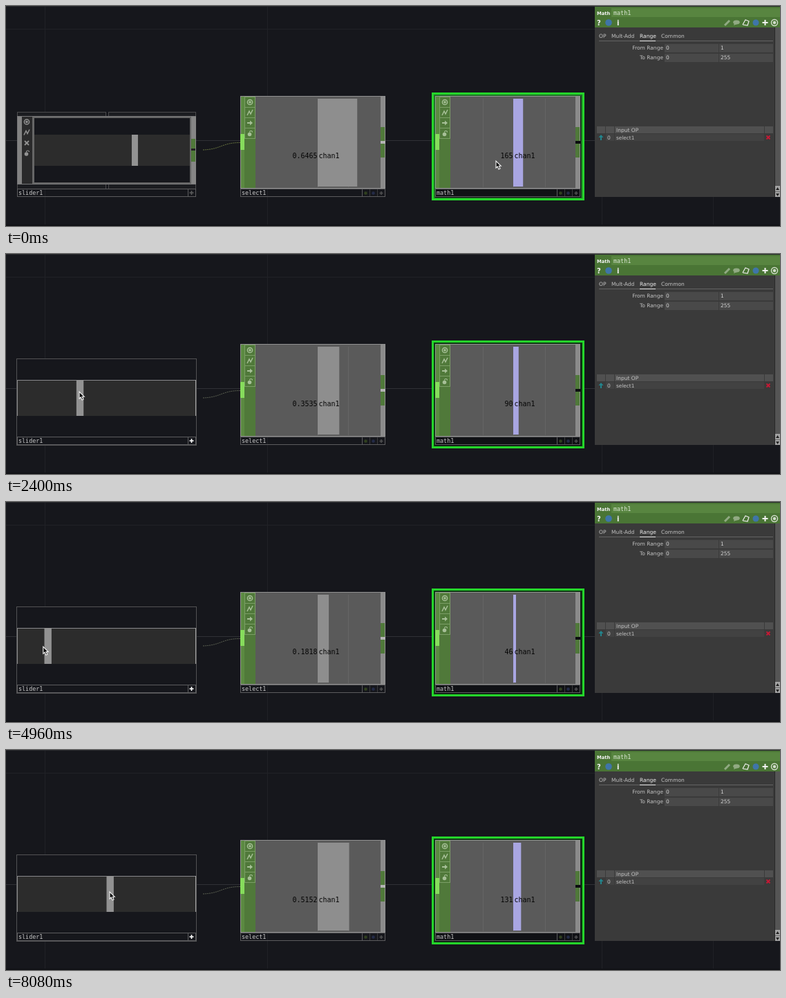
Write an HTML page with a canvas that moves like this. It is 1120 px wide and 318 px high and loops after 8160 ms.

```html
<!DOCTYPE html>
<html lang="en">
<head>
<meta charset="utf-8">
<title>Slider range</title>
<style>
html, body { margin: 0; width: 100%; height: 100%; overflow: hidden; background: #16171c; }
canvas { display: block; }
</style>
</head>
<body>
<canvas id="stage" width="1120" height="318"></canvas>
<script>
const ctx = document.getElementById('stage').getContext('2d');
const LOOP = 8160, STEP = 80;
const MONO = '"DejaVu Sans Mono", monospace', SANS = '"DejaVu Sans", sans-serif';
const GREEN = '#50793a', DARK = '#16171c';

// Pointer path: time, x, y
const path = [
  [0, 709, 224], [80, 690, 232], [480, 400, 283], [720, 281, 265], [880, 268, 268],
  [1280, 268, 268], [1600, 184, 206], [2320, 106, 199], [2400, 106, 199],
  [2900, 150, 202], [3600, 94, 204], [4000, 105, 206], [4080, 105, 206],
  [4320, 87, 208], [4480, 85, 208], [4640, 85, 208], [5440, 7, 211],
  [5520, 29, 211], [6320, 277, 216], [6400, 253, 217], [7120, 149, 203],
  [7680, 149, 203], [7840, 150, 205], [LOOP, 150, 205]
];

const clamp = (n, lo, hi) => Math.min(hi, Math.max(lo, n));

function pointer(t) {
  const i = Math.max(1, path.findIndex(p => p[0] >= t));
  const [t0, x0, y0] = path[i - 1], [t1, x1, y1] = path[i];
  const k = (t - t0) / (t1 - t0);
  return [x0 + (x1 - x0) * k, y0 + (y1 - y0) * k];
}

// The slider follows the pointer one step late, in 99 divisions.
function sliderValue(t) {
  if (t < 1680) return 64 / 99;
  const [x] = pointer(t - STEP);
  return Math.round(clamp((x - 14) / 262, 0, 1) * 99) / 99;
}

function box(x, y, x2, y2, fill, stroke) {
  if (fill) { ctx.fillStyle = fill; ctx.fillRect(x, y, x2 - x, y2 - y); }
  if (stroke) {
    ctx.strokeStyle = stroke;
    ctx.lineWidth = 1;
    ctx.strokeRect(x + .5, y + .5, x2 - x - 1, y2 - y - 1);
  }
}

function text(s, x, y, size, color, font = MONO, align = 'left', weight = '') {
  ctx.font = `${weight} ${size}px ${font}`;
  ctx.textAlign = align;
  ctx.fillStyle = color;
  ctx.fillText(s, x, y);
}

function poly(points, stroke, width = 1, fill) {
  ctx.beginPath();
  points.forEach(([x, y]) => ctx.lineTo(x, y));
  if (fill) { ctx.closePath(); ctx.fillStyle = fill; ctx.fill(); }
  if (stroke) { ctx.strokeStyle = stroke; ctx.lineWidth = width; ctx.stroke(); }
}

function disc(x, y, r, fill, stroke, width = 1) {
  ctx.beginPath();
  ctx.arc(x, y, r, 0, 7);
  if (fill) { ctx.fillStyle = fill; ctx.fill(); }
  if (stroke) { ctx.strokeStyle = stroke; ctx.lineWidth = width; ctx.stroke(); }
}

function plus(x, y, r, color, width = 2) {
  poly([[x - r, y], [x + r, y]], color, width);
  poly([[x, y - r], [x, y + r]], color, width);
}

function cross(x, y, r, color, width) {
  poly([[x - r, y - r], [x + r, y + r]], color, width);
  poly([[x - r, y + r], [x + r, y - r]], color, width);
}

function target(x, y, r, color) {
  disc(x, y, r, null, color, 1.5);
  disc(x, y, r * .5, color);
}

function flags(x, y, color, third) {
  target(x, y, 3.6, color);
  poly([[x - 4, y + 19], [x - 1, y + 13], [x + 1, y + 17], [x + 4, y + 11]], color, 1.5);
  if (third === 'cross') cross(x, y + 30.5, 3, color, 1.8);
  else {
    poly([[x - 4, y + 30], [x + 3, y + 30]], color, 2);
    poly([[x, y + 26.5], [x + 4, y + 30], [x, y + 33.5]], null, 1, color);
  }
  disc(x - .5, y + 46.5, 2.8, color);
  ctx.beginPath();
  ctx.arc(x + 1.5, y + 43.5, 2, Math.PI, 0);
  ctx.strokeStyle = color;
  ctx.lineWidth = 1.2;
  ctx.stroke();
}

function nameBar(name, x, x2, end) {
  box(x, 264, x2, 276, null, '#5c5c5e');
  box(x2 - 1, 264, end, 276, null, '#5c5c5e');
  text(name, x + 2, 273, 8.4, '#c8c8c8');
}

function backdrop() {
  box(0, 0, 1120, 318, DARK);
  box(0, 0, 1120, 1, '#292a2e');
  for (const x of [57, 379, 863, 1024]) box(x - 1, 1, x, 316, '#202126');
  box(0, 33, 852, 34, '#202126');
  box(0, 194, 852, 195, '#303136');
  box(0, 316, 1120, 318, '#101115');
}

function wire(active) {
  ctx.beginPath();
  ctx.moveTo(285, 208);
  ctx.bezierCurveTo(312, 207, 312, 197.5, 339, 197.5);
  ctx.strokeStyle = active ? '#5c6152' : '#68753f';
  ctx.lineWidth = 1;
  ctx.setLineDash([2, 1]);
  ctx.stroke();
  ctx.setLineDash([]);
}

function sliderNode(v, active, lit) {
  if (lit) box(12, 148, 280, 280, '#2c2c2c');
  if (active) {
    if (!lit) box(15, 151, 276, 277, DARK, '#525254');
    box(17, 182, 275, 234, '#2c2c2c');
    box(17, 182, 275, 183, '#88888a');
    box(16, 182, 17, 234, '#88888a');
    box(274, 182, 275, 234, '#a5a5a5');
    const mid = clamp(11.6 + 270 * v, 17, 274);
    box(Math.max(17, mid - 5.2), 182, Math.min(275, mid + 5.2), 234, '#929292');
  } else {
    for (const [y, y2] of [[153, 160], [257, 265]]) {
      box(16, y, 145, y2, '#1b1c20', '#4a4a4c');
      box(148, y, 275, y2, '#1b1c20', '#4a4a4c');
    }
    box(16, 159, 275, 258, '#2a2a2b', '#777779');
    box(17, 160, 23, 257, '#828282');
    flags(30, 167.5, '#929292', 'cross');
    box(38, 160, 268, 257, '#666');
    box(41, 162, 266, 255, DARK);
    box(41, 186, 266, 231, '#2c2c2c');
    const mid = 41 + 225 * v;
    box(mid - 4.5, 186, mid + 4.5, 231, '#929292');
    box(268, 160, 275, 257, '#858585');
    box(268, 192, 274, 206, GREEN);
    box(268, 206, 274, 209, '#222');
    box(268, 209, 274, 225, GREEN);
  }
  nameBar('slider1', 16, 264, 275);
  plus(268.5, 270, 3, active ? '#fff' : '#5c5c5c', 1.6);
}

function channelNode(x, name, zero, scale, guides, value, label, bar) {
  box(x, 130, x + 210, 264, '#5a5a5a', '#929292');
  box(x + 1, 131, x + 6, 263, '#5b8a41');
  box(x, 185, x + 6, 208, '#86dc5c');
  box(x + 6, 131, x + 22, 263, GREEN);
  for (let y = 131; y < 190; y += 15) box(x + 6, y, x + 22, y + 16, null, '#7b9e66');
  flags(x + 14, 139, '#a6bf97');
  for (const g of guides) box(g, 134, g + 1, 262, '#656565');
  ctx.setLineDash([3, 2]);
  poly([[zero + .5, 134], [zero + .5, 262]], '#6c6c6c', 1);
  ctx.setLineDash([]);
  box(zero, 134, zero + scale * value, 261, bar);
  box(x + 203, 131, x + 209, 263, '#8b8b8b');
  box(x + 203, 175, x + 209, 195, GREEN);
  box(x + 203, 195, x + 210, 199, name === 'math1' ? '#0c0d10' : '#b4b4b4');
  box(x + 203, 199, x + 209, 219, GREEN);
  text(label, zero - .5, 220, 10, '#050505', MONO, 'right');
  text('chan1', zero + 1.5, 220, 10, '#050505');
  nameBar(name, x, x + 177, x + 210);
  for (const d of [187, 198]) box(x + d, 265, x + d + 1, 275, '#3a3a3c');
  disc(x + 181.5, 270.5, 2.3, '#30401f');
  disc(x + 192.5, 270.5, 2.3, '#242b48');
  plus(x + 204, 270.5, 2.5, '#4f4f50', 1.6);
}

function panel() {
  box(852, 1, 1120, 276, '#3a3a3a');
  box(852, 1, 1120, 31, '#4a7535');
  box(876, 3, 1120, 16, '#588540');
  text('Math', 855, 13, 6.8, '#f2f2f2', SANS, 'left', 'bold');
  text('math1', 879, 13, 8.4, '#dce8d5');
  text('?', 855, 28, 10, '#f2f2f2', SANS, 'left', 'bold');
  disc(872, 24, 4.8, '#3f75a8');
  text('i', 884, 28, 10, '#f2f2f2', SANS, 'left', 'bold');

  poly([[1040, 28], [1047, 21]], '#91aa83', 3);
  ctx.beginPath();
  ctx.ellipse(1057, 23.5, 4.8, 3, 0, 0, 7);
  ctx.fillStyle = '#91aa83';
  ctx.fill();
  poly([[1054, 25], [1053, 28], [1058, 26]], null, 1, '#91aa83');
  poly([[1066, 27], [1070, 20], [1075, 22], [1073, 28], [1066, 27]], '#eee', 1.2);
  disc(1085, 24, 4.5, '#3f75a8');
  plus(1098.5, 24, 4, '#f2f2f2', 2);
  target(1112, 24, 4.5, '#cfdac8');

  const tabs = [['OP', 858], ['Mult-Add', 876], ['Range', 917], ['Common', 948]];
  for (const [s, x] of tabs) text(s, x, 46, 7.5, s === 'Range' ? '#eee' : '#c4c4c4', SANS);
  box(858, 50, 1110, 51, '#636363');
  box(917, 50, 940, 51, '#eee');

  [['From Range', 55, '0', '1'], ['To Range', 69, '0', '255']].forEach(([s, y, a, b]) => {
    text(s, 951, y + 8, 7.5, '#c4c4c4', SANS, 'right');
    box(953, y, 1031, y + 12, '#494949');
    box(1032, y, 1110, y + 12, '#494949');
    text(a, 955, y + 8, 7.5, '#d2d2d2', SANS);
    text(b, 1034, y + 8, 7.5, '#d2d2d2', SANS);
  });

  for (const [a, b] of [[855, 867], [868, 880], [881, 1097], [1098, 1110]])
    box(a, 174, b, 184, '#505050');
  text('Input OP', 883, 181.5, 7.5, '#c4c4c4', SANS);
  box(868, 185, 880, 195, '#424242');
  box(881, 185, 1097, 195, '#424242');
  poly([[861, 194], [861, 188]], '#23848c', 2);
  poly([[857.5, 190], [861, 186], [864.5, 190]], null, 1, '#23848c');
  text('0', 870, 192.5, 7.5, '#c4c4c4', SANS);
  text('select1', 883, 192.5, 7.3, '#c4c4c4', SANS);
  cross(1103, 190, 2.5, '#c71935', 1.8);

  box(1112, 31, 1113, 276, '#292929');
  box(1113, 31, 1120, 276, '#555');
  box(1113, 260, 1120, 276, '#a5a5a5');
  box(1113, 268, 1120, 269, '#666');
  poly([[1114, 266], [1116.5, 262], [1119, 266]], null, 1, '#222');
  poly([[1114, 271], [1119, 271], [1116.5, 275]], null, 1, '#222');
}

function arrow(x, y) {
  const shape = [[0, 0], [0, 10], [2.3, 8], [4, 12], [6, 11], [4.3, 7.3], [7.3, 7.3], [0, 0]];
  poly(shape.map(([a, b]) => [x + a, y + b]), '#f4f4f4', 1.1, '#0a0a0a');
}

function draw(t) {
  const v = sliderValue(t), [x, y] = pointer(t);
  const active = t >= 1040;
  const lit = (t >= 800 && t < 1120) || (t >= 5440 && t < 5600);
  backdrop();
  wire(active);
  sliderNode(v, active, lit);
  const label = v % 1 ? v.toFixed(4) : String(v);
  channelNode(339, 'select1', 451, 88.5, [495], v, label, '#8e8e8e');
  box(616, 125, 837, 281, '#25d52b');
  box(619, 128, 834, 278, x > 616 ? '#1f7426' : '#0d3a12');
  box(621, 130, 832, 277, '#101115');
  channelNode(621, 'math1', 734, 22, [690, 780], v, String(Math.round(v * 255)), '#a9a6e2');
  panel();
  arrow(x, y);
}

function tick() {
  draw(Math.floor(performance.now() % LOOP / STEP) * STEP);
  requestAnimationFrame(tick);
}
tick();
</script>
</body>
</html>
```
